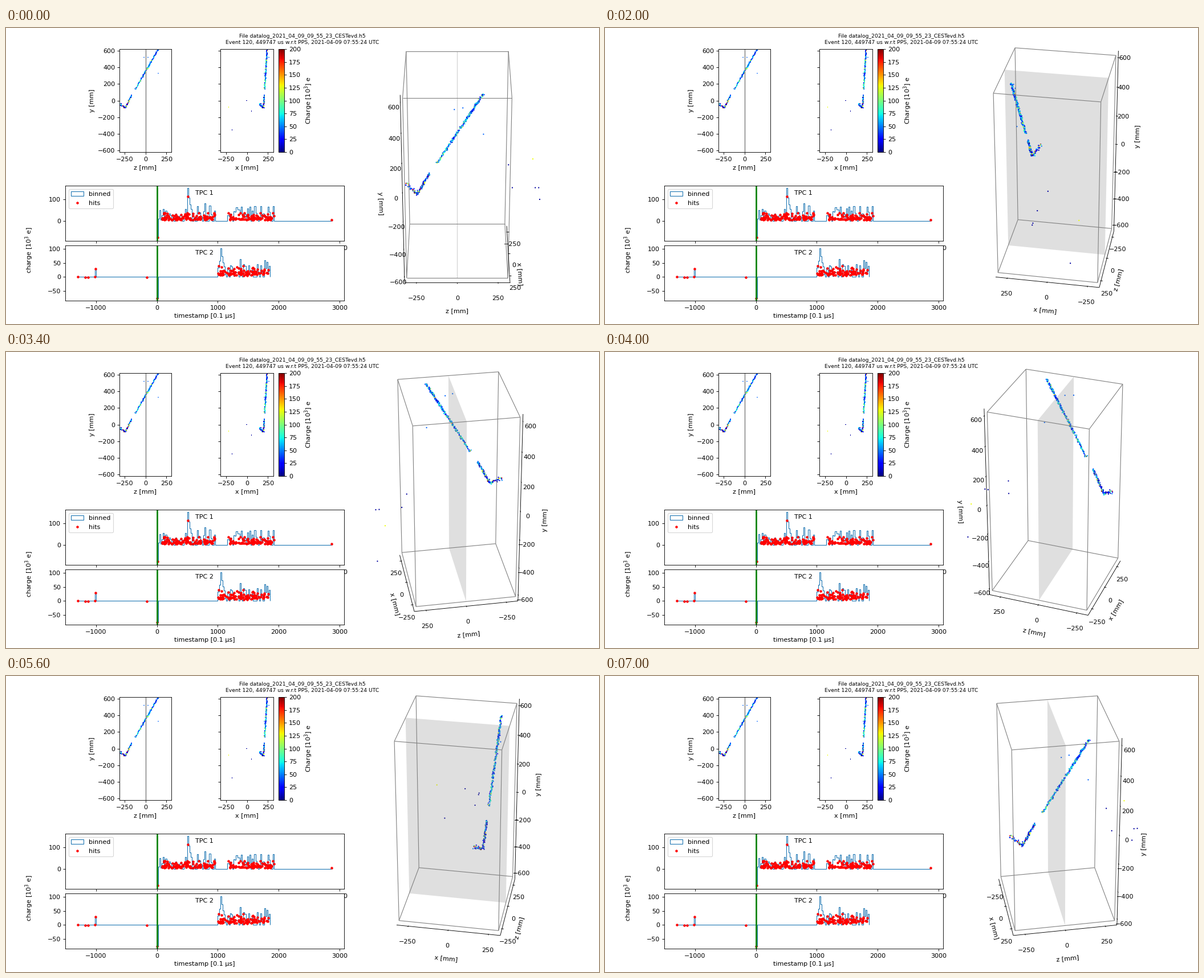
Animation of 1040x520 px, one loop 7200 ms. Source, as a matplotlib script:

```python
import itertools

import numpy as np
import matplotlib.pyplot as plt
from matplotlib.animation import FuncAnimation
from matplotlib.cm import ScalarMappable
from matplotlib.collections import LineCollection
from matplotlib.colors import Normalize
from matplotlib.patches import Polygon, Rectangle

WIDTH, HEIGHT, DPI = 1040, 520, 80
FRAMES, INTERVAL = 36, 200
LIMIT = np.array([310.0, 310.0, 620.0])  # x, z, y in mm
BOX_HALF = np.array([1, 1, 2]) * 1.8294640721620434 / np.sqrt(6) / 2
ELEV, DIST = np.radians(30), 10
SIDE_TICKS, TALL_TICKS = range(-250, 251, 250), range(-600, 601, 200)

rng = np.random.default_rng(120)
plt.rcParams["font.family"] = "DejaVu Sans"
fig = plt.figure(figsize=(WIDTH / DPI, HEIGHT / DPI), dpi=DPI)
fig.suptitle(
    "File datalog_2021_04_09_09_55_23_CESTevd.h5\n"
    "Event 120, 449747 us w.r.t PPS, 2021-04-09 07:55:24 UTC",
    size="small",
)
jet = ScalarMappable(Normalize(0, 200), "jet")


def pixel_axes(left, top, right, bottom):
    return fig.add_axes([left / WIDTH, 1 - bottom / HEIGHT,
                         (right - left) / WIDTH, (bottom - top) / HEIGHT])


# ---- event data -----------------------------------------------------------
def segment(start, end, count, jitter=3):
    t = rng.random((count, 1))
    return start + t * np.subtract(end, start) + rng.normal(0, jitter, (count, 3))


vertex = (197, -240, -87)
upper = segment((240, 150, 612), (212, -123, 131), 290)
lower = np.vstack([segment((208, -165, 63), vertex, 100),
                   segment(vertex, (152, -306, -40), 40, 5)])
strays = np.array([(261, -17, 520), (241, 32, 520), (209, 153, 330),
                   (-5, 312, 0), (-176, 522, -352), (-217, 473, -80)]
                  + [(55, z, -127) for z in (336, 476, 497)])
hits = np.vstack([upper, lower, strays])
charge = np.concatenate([rng.gamma(4, 15, len(upper)), rng.gamma(1.5, 40, len(lower)),
                         np.where(strays[:, 2] > 0, 45, 6)])
charge[hits[:, 0] < -200] = 128
hit_colors = jet.to_rgba(charge)


# ---- flat projections -----------------------------------------------------
def flat_view(ax, column, xlim, xlabel):
    ax.scatter(hits[:, column], hits[:, 2], s=2, marker="s", c=hit_colors, linewidths=0)
    ax.set(xlim=(-xlim, xlim), ylim=(-620, 620), xlabel=xlabel,
           xticks=SIDE_TICKS, yticks=TALL_TICKS)


ax_zy = pixel_axes(199, 37, 290, 218)
flat_view(ax_zy, 1, 310, "z [mm]")
ax_zy.axvline(0, color="gray", lw=1.3)
ax_zy.set_ylabel("y [mm]")

ax_xy = pixel_axes(376, 37, 469, 218)
flat_view(ax_xy, 0, 316, "x [mm]")
ax_xy.tick_params(labelleft=False)

bar = fig.colorbar(jet, cax=pixel_axes(478, 37, 488, 218), ticks=range(0, 201, 25))
bar.set_label("Charge [$10^3$] e")


# ---- charge against time --------------------------------------------------
BIN = 20


def time_view(ax, title, spans, spike, lone_hits, ylim, yticks):
    """Spans are (begin, end, typical bin charge); the spike decays after its start."""
    times, charges = np.array(lone_hits, float).T
    edges = np.arange(times.min() // BIN * BIN, max(times.max(), spans[-1][1]) + BIN, BIN)
    left = edges[:-1]
    values = np.histogram(times, edges, weights=charges)[0]
    for begin, end, scale in spans:
        inside = (left >= begin) & (left < end)
        n = inside.sum()
        values[inside] = np.minimum(rng.gamma(2, scale, n), 4.2 * scale) * (rng.random(n) > 0.2)
        count = int(2.4 * n)
        times = np.append(times, rng.uniform(begin, end, count))
        charges = np.append(charges, np.minimum(5 + rng.gamma(2, 6, count), 38))
    start, height = spike
    decay = height * np.exp((start - left) / (3 * BIN))
    values = np.where((left >= start) & (left < start + 4 * BIN),
                      np.maximum(values, decay), values)

    ax.stairs(values, edges, color="C0", lw=1)
    ax.plot(times, charges, "r.")
    ax.axvline(0, color="green", lw=2.4, zorder=2.5)
    ax.text(0.498, 0.83, title, transform=ax.transAxes, ha="center")
    ax.set(xlim=(-1502, 3074), ylim=ylim, xticks=range(-1000, 3001, 1000), yticks=yticks)


ax_tpc1 = pixel_axes(104, 277, 593, 374)
time_view(ax_tpc1, "TPC 1",
          [(20, 500, 13), (500, 760, 16), (760, 960, 26), (1160, 1920, 16)], (500, 150),
          [(10, -74), (510, 113), (2870, 7)], (-89, 161), [0, 100])
ax_tpc1.legend([Rectangle((0, 0), 1, 1, fc="none", ec="C0"), ax_tpc1.lines[0]],
               ["binned", "hits"], loc="upper left")

ax_tpc2 = pixel_axes(104, 382, 593, 479)
time_view(ax_tpc2, "TPC 2", [(1000, 1860, 15)], (1040, 101),
          [(-1300, 0), (-1170, -2), (-1130, -2), (-1015, 0), (-1010, 28), (-165, -2), (0, -76)],
          (-84, 111.5), range(-50, 101, 50))
ax_tpc2.set_xlabel("timestamp [0.1 µs]")
fig.text(41 / WIDTH, 1 - 390 / HEIGHT, "charge [$10^3$ e]", rotation=90, ha="center", va="center")

# ---- rotating view --------------------------------------------------------
ax_3d = pixel_axes(564.5, 26, 1006.5, 468)
ax_3d.set(xlim=(-0.095, 0.09), ylim=(-0.095, 0.09))
ax_3d.axis("off")

# All 3D positions below are in units where the box spans -1..1.
EDGE = 1 + 1 / 24
DELTA = 1 / 6
POINT = 48 / (2 * 442 / DPI * 72) * DELTA
TICK_PAD = 11.5 * POINT
# (axis index, axis switched to its near side, name, label distance, ticks)
AXES = [(0, 1, "x [mm]", 25 * POINT, SIDE_TICKS),
        (1, 0, "z [mm]", 25 * POINT, SIDE_TICKS),
        (2, 0, "y [mm]", 39.5 * POINT, TALL_TICKS)]

corners = np.array(list(itertools.product((-1, 1), repeat=3)))
box_edges = np.array([(a, b) for a, b in itertools.combinations(corners, 2)
                      if np.abs(a - b).sum() == 2])
plane_corners = np.array([(-1, 0, -1), (1, 0, -1), (1, 0, 1), (-1, 0, 1)])
hit_points = hits / LIMIT

box_lines = ax_3d.add_collection(LineCollection([], colors="gray", lw=1, zorder=6))
axis_lines = ax_3d.add_collection(
    LineCollection([], colors="black", lw=0.8, zorder=7, clip_on=False))
plane = ax_3d.add_patch(Polygon(np.zeros((4, 2)), fc=(0.5, 0.5, 0.5, 0.25)))
points = ax_3d.scatter(*np.zeros((2, len(hits))), s=1, zorder=4)
names = [ax_3d.text(0, 0, axis[2], ha="center", va="center") for axis in AXES]
tick_texts = [[ax_3d.text(0, 0, f"{v}".replace("-", "\u2212"), ha="center", va="top")
               for v in axis[-1]] for axis in AXES]


def project(pos, azim):
    """Return screen positions and distances from the camera."""
    x, y, z = np.moveaxis(np.asarray(pos) * BOX_HALF, -1, 0)
    right = y * np.cos(azim) - x * np.sin(azim)
    toward = x * np.cos(azim) + y * np.sin(azim)
    depth = DIST - toward * np.cos(ELEV) - z * np.sin(ELEV)
    up = z * np.cos(ELEV) - toward * np.sin(ELEV)
    return np.stack([right, up], axis=-1) / depth[..., None], depth


def pushed_out(pos, index, pad):
    moved = pos + np.where(pos < 0, -pad, pad)
    moved[index] = pos[index]
    return moved


def draw_axes(azim):
    far = np.array([-EDGE if np.cos(azim) >= 0 else EDGE,
                    -EDGE if np.sin(azim) >= 0 else EDGE, -EDGE])
    lines = []
    for (index, flip, _, pad, ticks), name, texts in zip(AXES, names, tick_texts):
        start = far.copy()
        start[flip] *= -1
        end = start.copy()
        end[index] *= -1
        line = project([start, end], azim)[0]
        lines.append(line)

        dx, dy = line[1] - line[0]
        angle = np.degrees(np.arctan2(dy, dx)) % 180
        name.set_position(project(pushed_out((start + end) / 2, index, pad), azim)[0])
        name.set_rotation(angle - 180 if angle > 90 else angle)

        for value, text in zip(ticks, texts):
            pos = start.copy()
            pos[index] = value / LIMIT[index]
            inner, outer = pos.copy(), pos.copy()
            inner[flip] += 0.1 * DELTA * np.sign(far[flip])
            outer[flip] -= 0.2 * DELTA * np.sign(far[flip])
            lines.append(project([inner, outer], azim)[0])
            text.set_position(project(pushed_out(pos, index, TICK_PAD), azim)[0])
    axis_lines.set_segments(lines)


def update(frame):
    azim = np.radians(360 * frame / FRAMES)
    box_lines.set_segments(project(box_edges, azim)[0])
    draw_axes(azim)

    outline, plane_depth = project(plane_corners, azim)
    plane.set_xy(outline)
    edge_on = abs(np.sin(azim)) < 1e-6
    plane.set_edgecolor((0.5, 0.5, 0.5, 0.35) if edge_on else "none")

    xy, depth = project(hit_points, azim)
    order = np.argsort(-depth)
    points.set_offsets(xy[order])
    points.set_facecolor(hit_colors[order])
    points.set_edgecolor(hit_colors[order])
    plane.set_zorder(5 if plane_depth.min() < depth.min() else 3)
    return []


anim = FuncAnimation(fig, update, frames=FRAMES, interval=INTERVAL, repeat=True, repeat_delay=0)
plt.show()
```
